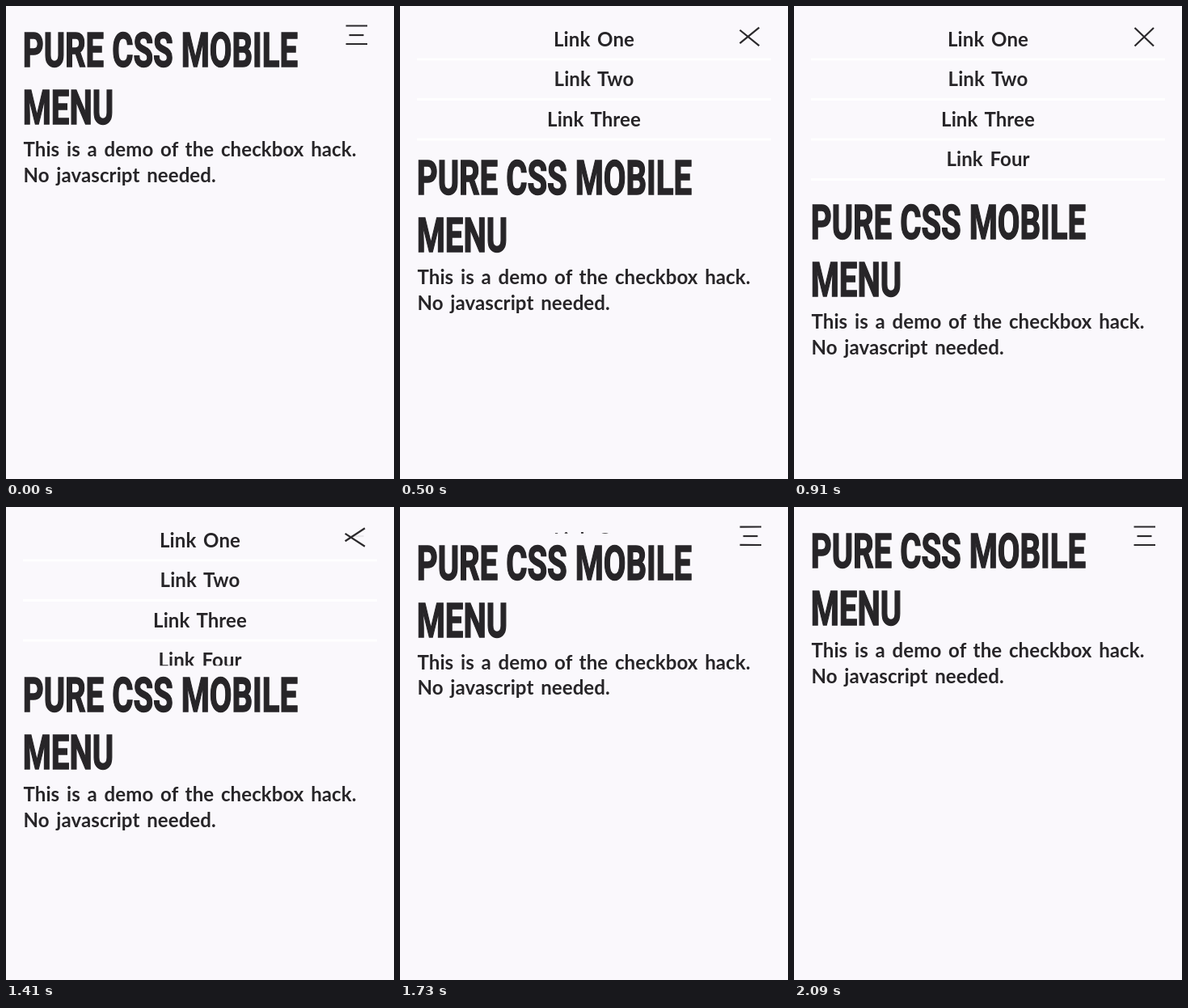
An HTML page for the animation above (2220 ms loop, 480x585 px).

```html
<!DOCTYPE html>
<html lang="en">
<head>
<meta charset="utf-8">
<title>Mobile menu</title>
<style>
  html, body { margin: 0; height: 100%; overflow: hidden; background: #faf8fc; }
  svg { display: block; width: 480px; height: 585px; }
  text { fill: #272528; font: 700 24px Lato, "Open Sans", sans-serif; letter-spacing: .1px; word-spacing: 2.8px; }
  .title text { font: 700 59.5px Roboto, sans-serif; letter-spacing: 0; word-spacing: 0; stroke: #272528; stroke-width: 1.6px; }
  .links text { text-anchor: middle; }
  .links path { stroke: #fff; stroke-width: 3; }
  .icon path { stroke: #2b292c; stroke-width: 2.2; fill: none; }
</style>
</head>
<body>
<svg viewBox="0 0 480 585">
  <clipPath id="fold"><rect id="window" y="18" width="480" height="0"/></clipPath>
  <g class="links" clip-path="url(#fold)">
    <text x="240" y="49.5">Link One</text>
    <text x="240" y="99">Link Two</text>
    <text x="240" y="148.5">Link Three</text>
    <text x="240" y="198">Link Four</text>
    <path d="M21 66H459M21 115.5H459M21 165H459M21 214.5H459"/>
  </g>
  <g id="page">
    <g class="title" transform="translate(20.75 75.3) scale(.674 1)">
      <text>PURE CSS MOBILE</text>
      <text y="70.7">MENU</text>
    </g>
    <text x="21.5" y="186">This is a demo of the checkbox hack.</text>
    <text x="21.5" y="217.7">No javascript needed.</text>
  </g>
  <g class="icon">
    <path id="bars"/>
    <path id="middle" d="M424.5 36H442.5"/>
  </g>
</svg>
<script>
  const LOOP = 2220, FPS = 22, MENU_HEIGHT = 213;
  const $ = id => document.getElementById(id);
  const page = $('page'), fold = $('window'), bars = $('bars'), middle = $('middle');
  const clamp = v => Math.min(1, Math.max(0, v));
  const mix = (a, b, p) => a + (b - a) * p;

  // cubic-bezier(.25, .1, .25, 1), solved by bisection
  function ease(x) {
    if (x <= 0 || x >= 1) return clamp(x);
    const curve = (u, a, b) => 3 * (1 - u) ** 2 * u * a + 3 * (1 - u) * u * u * b + u ** 3;
    let lo = 0, hi = 1;
    for (let i = 0; i < 24; i++) {
      const mid = (lo + hi) / 2;
      if (curve(mid, .25, .25) < x) lo = mid; else hi = mid;
    }
    return curve(lo, .1, 1);
  }

  const ramp = (t, start, length) => ease((t - start) / length);
  const tickTime = n => Math.round(n * 100 / FPS) * 10;

  function draw(time) {
    // the picture advances in 22 steps per second
    let tick = Math.floor((time + 5) * FPS / 1000);
    if (tickTime(tick) > time) tick--;
    const t = tick * 1000 / FPS;

    const open = tick < 7 ? 0 : ramp(t, 252, 558) - ramp(t, 1327, 590);
    const shift = MENU_HEIGHT * open;
    page.setAttribute('transform', `translate(0 ${shift.toFixed(2)})`);
    fold.setAttribute('height', Math.max(0, shift));

    const cross = ramp(t, 295, 360) - ramp(t, 1320, 450);
    const drift = -8 * cross * (1 - cross);
    const left = mix(420.5, 421.5, cross) + drift;
    const right = mix(447, 445, cross) + drift;
    const bar = (y, yLeft, yRight) =>
      `M${left} ${mix(y, yLeft, cross)}L${right} ${mix(y, yRight, cross)}`;
    bars.setAttribute('d', bar(24.5, 49.5, 27) + bar(47, 27, 49.5));
    middle.setAttribute('opacity', clamp(1 - 1.3 * cross));
  }

  const begin = performance.now();
  function loop() {
    draw((performance.now() - begin) % LOOP);
    requestAnimationFrame(loop);
  }
  loop();
</script>
</body>
</html>
```
